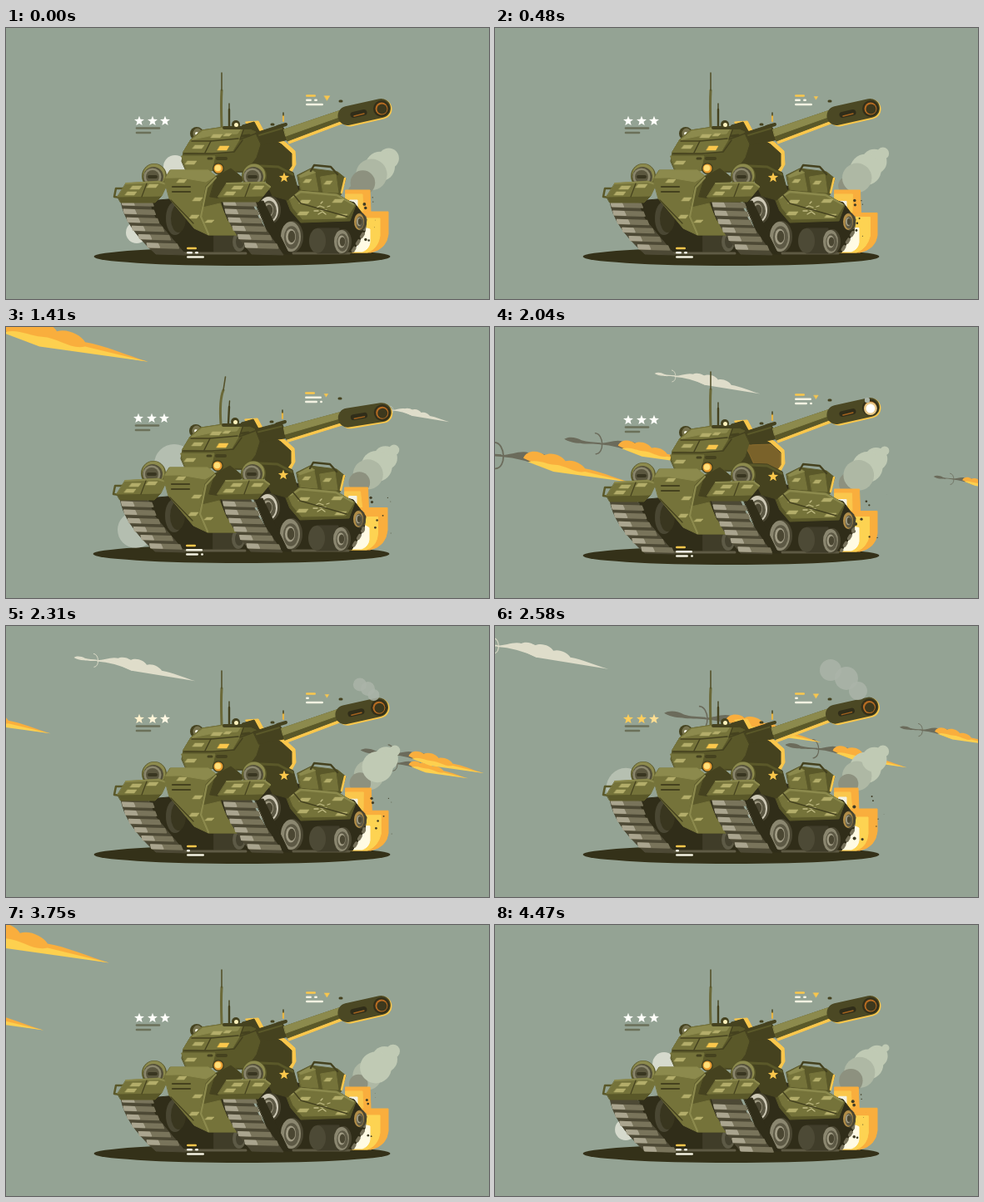
Recreate the animation shown at these times as an HTML page with a canvas. Size 580x326 px, loop 4500 ms.

```html
<!DOCTYPE html>
<html lang="en">
<head>
<meta charset="utf-8">
<title>Tank</title>
<style>
html, body { margin: 0; width: 100%; height: 100%; overflow: hidden; background: #94a394 }
canvas { display: block }
</style>
</head>
<body>
<canvas id="stage" width="580" height="326"></canvas>
<script>
const g = document.getElementById('stage').getContext('2d');
const LOOP = 4500;
const BASE = '#75733a', LIGHT = '#8c8a4d', SHADE = '#5a5829', DARK = '#45421f', BLACK = '#302d19',
  PATCH = '#b3ad6a', YELLOW = '#fac74c', ORANGE = '#f9ae3d', WHITE = '#f3f2e2', SMOKE = '#6b6b5b';

g.lineCap = g.lineJoin = 'round';

// Drawing helpers: filled path, stroked path, ellipse, group
function fill(color, d, round = 1) {
  const p = new Path2D('M' + d + 'z');
  g.fillStyle = g.strokeStyle = color;
  g.lineWidth = round;
  g.fill(p);
  if (round) g.stroke(p);
}
function line(color, width, d) {
  g.strokeStyle = color;
  g.lineWidth = width;
  g.stroke(new Path2D('M' + d));
}
function oval(color, x, y, rx, ry = rx, angle = 0) {
  g.fillStyle = color;
  g.beginPath();
  g.ellipse(x, y, Math.max(0, rx), Math.max(0, ry), angle, 0, 7);
  g.fill();
}
function group(draw, place) {
  g.save();
  if (place) place();
  draw();
  g.restore();
}
function pivot(deg, x, y) {
  g.translate(x, y);
  g.rotate(deg * Math.PI / 180);
  g.translate(-x, -y);
}
function patches(color, list, w = 11, h = 4) {
  for (const [x, y] of list) fill(color, `${x} ${y}h${w}l-3 ${h}h${-w}`, .5);
}
const mix = (a, b, k) => a + (b - a) * k;
const bell = (t, center, width) => Math.max(0, 1 - ((t - center) / width) ** 2);
const noise = n => { const v = Math.sin(n * 91.7) * 4375.5; return v - Math.floor(v); };

// Body lift over the bump, then a damped bounce after landing
const lift = t => t > 560 && t < 1330 ? Math.sin(Math.PI * (t - 560) / 770) : 0;
const bounce = t => t > 1300 && t < 2040 ?
  1.47 * Math.exp((1300 - t) / 300) * Math.sin((t - 1300) / 80) : 0;

// Aircraft: keys are [time, nose x, nose y, body length]
const planes = [
  { reach: 3.84, keys: [[900, 427, 110, 36], [1410, -128, -14, 78]] },
  { reach: 5.3, pale: true, keys: [[2040, 192, 56, 24], [2580, -28, 20, 31]] },
  { reach: 3.84, keys: [[1410, 620, 235, 22], [2040, 84, 135, 43]] },
  { reach: 3.84, keys: [[1410, 615, 262, 28], [2040, -46, 148, 54]] },
  { reach: 3.84, keys: [[2040, 527, 180, 23], [2580, 349, 143, 38], [3120, 57, 107, 60]] },
  { reach: 3.84, keys: [[2580, 204, 105, 49], [3120, -241, 16, 70]] },
  { reach: 4.5, keys: [[2580, 487, 122, 26], [3120, -90, -3, 50]] },
  { reach: 5, keys: [[3120, 457, 110, 25], [3660, -60, 10, 50]] }
];
function drawPlane({ reach, pale, keys }, t) {
  const i = keys.length > 2 && t > keys[1][0] ? 1 : 0;
  const a = keys[i], b = keys[i + 1], k = (t - a[0]) / (b[0] - a[0]);
  const [, x, y, size] = a.map((v, n) => mix(v, b[n], k));
  if (size < 4 || x > 590 || x + size * reach < 0) return;
  const body = pale ? '#dfddca' : SMOKE;
  group(() => {
    g.scale(size / 60, size / 60);
    fill(body, '0 0C8 -5 20 -3 29 2 38 5 50 5 61 6L61 9C50 8 35 9 27 7 16 7 6 4 0 0', 0);
    line(body, 2, '52 -10C66 -9 68 24 53 25');
    g.translate(60, 7);
    const s = (reach * 60 - 60) / 170;
    g.scale(s, s);
    fill(body, '0 0C14 0 26 -7 38 -3 55 -6 68 4 86 14L60 18Q30 4 0 2', 0);
    fill(pale ? body : ORANGE, '30 4C34 -7 50 -7 58 0 68 -5 82 1 86 8 95 5 108 11 112 18 130 21 150 30 170 36L60 18', 0);
    if (!pale) fill('#fdd04f', '36 9C50 5 60 12 72 13 88 14 98 25 112 22L170 36 70 22', 0);
  }, () => g.translate(x, y));
}

function drawSmoke(t) {
  g.fillStyle = '#c9d0c2';
  const side = Math.max(bell(t, 900, 330), bell(t, 2850, 620));
  const low = Math.max(bell(t, 0, 420), bell(t, 4500, 420), bell(t, 1410, 360));
  const late = bell(t, 1410, 500);
  g.globalAlpha = .65;
  oval('#c9d0c2', 157, 196, 29 * side, 31 * side);
  g.globalAlpha = 1 - .5 * late;
  oval('#d6dacd', 157, 246, (13 + 9 * late) * low);
  oval('#d6dacd', 203, 167, (14 + 10 * late) * low);
  g.globalAlpha = 1;
  for (let i = 4; i >= 0; i--) {
    const u = (t / 1500 + i / 5) % 1;
    oval(u < .25 ? '#8d917f' : u < .5 ? '#aeb8a4' : '#c0cab4',
      mix(418, 470, u), mix(196, 147, u), 19 * Math.sin(Math.PI * (.12 + .82 * u)));
  }
}

function drawFire(t) {
  const f = 1.5 * Math.sin(t / 4500 * Math.PI * 24);
  fill(ORANGE, `408 195L${437 + f} 195 ${438 + f} 222 408 222`, 1);
  fill(YELLOW, `408 200L${428 + f} 200 429 222 408 222`, 1);
  fill(WHITE, `413 ${207 + f}h9v9h-9`, 1);
  fill(ORANGE, `408 ${221 + f}H459V${248 + f}Q457 266 438 270L412 270`, 1);
  fill('#fdd352', `408 ${229 - f}H${449 + f}V250Q447 265 434 270L412 270`, 1);
  fill('#fffbe4', `412 247Q430 ${238 + f} 437 ${242 - f}V258Q436 266 428 269L412 269`, 1);
  const spread = t > 600 && t < 3500 ? 1 : .4;
  for (let i = 0; i < 9; i++) {
    const u = (t / 900 + noise(i)) % 1;
    oval('#3f3c25', 428 + 45 * u * spread, 208 + 55 * noise(i + 20) - 8 * u, 2.2 * (1 - u));
  }
}

function drawTrack(x, bend, curve, width, t) {
  const edge = u => x + bend * u + curve * u * u;
  fill('#4d4935', `${x} 208Q${x + bend / 2} 238 ${edge(1)} 272L${edge(1) + width} 273 ${x + width + 6} 230 ${x + width - 4} 208`);
  for (let i = 0; i < 6; i++) {
    const u = (i + (t / 150) % 1) / 6, y = 208 + 61 * u, left = edge(u);
    fill('#79745b', `${left + 1} ${y}l${width} 1l2 5l${-width} -1`, 1.5);
    fill('#aaa58f', `${left + 1} ${y}l13 .5l2 4.5l-14 -.5`, 1.5);
  }
}

function drawDrum(x, y) {
  oval(SHADE, x + 1, y, 15);
  oval(LIGHT, x + 1, y - 1, 13.5);
  oval('#545039', x, y + 1, 12);
  oval('#8b876d', x - 1, y + 1, 10.5);
  oval('#5b573f', x - 1, y + 1, 8);
  line('#393621', 4, `${x - 5} ${y + 1}h8`);
}

function drawWheel(x, y, rx, ry, rim = '#8b8770') {
  oval('#4a4632', x + 2, y, rx + 1, ry + 1);
  oval(rim, x, y, rx, ry);
  oval('#5d5945', x + 1, y + 1, rx * .75, ry * .76);
  oval('#a19c85', x, y, rx * .5, ry * .53);
  oval('#4b4733', x + 1, y, rx * .36, ry * .4);
}

function star(color, x, y, r) {
  g.beginPath();
  for (let i = 0; i < 10; i++) {
    const a = i * Math.PI / 5 - Math.PI / 2, q = i % 2 ? r * .42 : r;
    g.lineTo(x + q * Math.cos(a), y + q * Math.sin(a));
  }
  g.fillStyle = color;
  g.fill();
}

function drawGun(flash) {
  fill(DARK, '300 126 331 116 340 134 307 141');
  line(SHADE, 2, '304 129 331 121');
  fill(YELLOW, '336 126 404 103 406 114 340 139');
  fill(SHADE, '334 122 402 99 404 111 338 136');
  fill(LIGHT, '334 122 402 99 403 106 336 130');
  line(YELLOW, 24, '413 106.5 451.5 97.5');
  line('#4b4824', 23, '410 105.5 450.5 96.5');
  line(BLACK, 7, '417 104.5 430 101.5');
  line('#a3631f', 1.5, '418 106 430 103');
  oval('#34301a', 451, 97, 10);
  oval('#b86c22', 451, 97, 7.5);
  oval('#3d381d', 451.5, 97.5, 6);
  if (flash) {
    oval('#e9c98a', 451, 98, 8 * flash);
    oval('#fff', 451, 98, 5.5 * flash);
  }
}

function drawTurret(t) {
  const b = bounce(t), kick = t > 2040 ? 6 * Math.exp((2040 - t) / 400) * Math.min(1, (t - 2040) / 60) : 0;
  const flash = bell(t, 2050, 80);
  line('#6b6938', 3, `259 119Q${258 - b} 90 ${259 + 3 * b} ${75 + 3 * b}`);
  line('#55522b', 1.6, `${259 + 3 * b} ${75 + 3 * b}L${259 + 5.5 * b} ${54 + 8 * b}`);
  line(DARK, 2.4, `268 118L${268 + b} 98`);
  line(DARK, 1.4, `${268 + b} 98L${268 + 1.5 * b} 91`);
  oval(DARK, 229, 127, 8);
  oval('#77734f', 230, 127, 5.5, 6.5);
  oval(WHITE, 229, 127, 2);
  fill(YELLOW, '288 113 303 112 309 123 336 138 347 148 348 164 342 175 310 172 296 130');
  fill(DARK, '284 117 298 113 304 124 331 140 343 151 343 166 337 174 260 173 280 130');
  if (flash) {
    g.globalAlpha = .5 * flash;
    fill('#b08336', '300 142 331 141 343 152 343 166 337 174 314 172 306 154');
    g.globalAlpha = 1;
  }
  fill(SHADE, '211 160 213 149 222 134 235 123 262 119 286 119 300 125 306 137 300 156 288 172 216 171');
  fill(BASE, '213 149 222 134 235 123 262 119 286 119 281 133 272 148 252 151');
  fill(LIGHT, '224 134 236 124 262 120 283 120 278 127 244 130');
  fill(BASE, '211 154 251 154 247 172 217 171');
  line(DARK, 1.5, '214 151 248 151 274 149 284 135');
  line(DARK, 1.5, '223 136 246 136 279 133');
  line(DARK, 1.5, '246 136 239 150');
  line(DARK, 1.5, '286 120 281 134 300 127');
  patches(PATCH, [[249, 128], [227, 141], [218, 160]]);
  patches(PATCH, [[264, 127]], 7, 3);
  fill(YELLOW, '257 142h11l-3 5h-11', .5);
  line(DARK, 4, '254 157h10');
  line(DARK, 3, '284 130l8 -1');
  line(DARK, 3, '243 157h4');
  line(DARK, 4, '262 120h30');
  oval(DARK, 276, 116, 5);
  oval('#fff2bc', 276.5, 116.5, 2.5);
  line(DARK, 4, '326 119 336 116');
  line(DARK, 3, '319 116h2');
  line('#e7b545', 2.2, '333 112V105');
  line(DARK, 1.5, '333 105V102');
  line(DARK, 3, '401 88h2');
  group(() => drawGun(flash), () => {
    pivot(3.5 * b, 318, 130);
    g.translate(-kick, kick * .4);
  });
}

function drawFront(t) {
  fill(BLACK, '172 208 262 200 300 235 296 270 240 272 190 268');
  oval('#4a4733', 203, 229, 11, 20);
  oval('#39361f', 207, 229, 9, 17);
  fill('#403d29', '250 246H279V269H250');
  oval('#5d5a46', 280, 257, 8, 12);
  oval('#454230', 281, 257, 5, 8);
  line('#5f5b45', 3, '212 271H288');
  drawTrack(138, 8, 34, 36, t);
  line(SHADE, 2.5, '141 193 132 193 130 203 137 204');
  drawDrum(177, 178);
  fill(SHADE, '134 203 187 202 179 210 138 210');
  fill(BASE, '144 187 183 184 194 187 187 202 134 203');
  line(LIGHT, 2, '144 187 183 185 193 188');
  patches(PATCH, [[152, 190], [172, 188], [146, 197]]);
  line(DARK, 1.2, '169 187 163 203');

  fill(BASE, '190 182 197 171 243 171 253 179 240 191 233 228 243 249 226 241 196 205');
  fill(LIGHT, '192 180 198 171 243 171 252 178 240 185 210 180');
  fill(SHADE, '252 178 270 168 286 182 257 207 264 230 287 249 243 249 233 228 240 191');
  fill(DARK, '252 179 270 169 286 182 258 205 245 203');
  fill(BASE, '236 216 257 211 266 232 286 249 243 249 233 228');
  line(LIGHT, 2.2, '252 180 241 192 234 227 243 248');
  line(DARK, 2.2, '200 191h21');
  line(DARK, 2.2, '200 197h21');
  patches(PATCH, [[208, 182], [227, 204], [223, 225]], 9);
  patches(PATCH, [[242, 231]], 8, 3);
  line(DARK, 1.2, '198 207 225 235');
  oval(DARK, 255, 169, 7);
  oval('#e99d31', 255, 169, 5.5);
  oval('#ffdf78', 254.5, 168.5, 3.8);
}

function drawSide(t) {
  fill(BLACK, '300 195 350 190 418 210 433 230 431 245 416 270 335 272 315 250');
  g.setLineDash([4, 6]);
  g.lineDashOffset = t / 15;
  line('#77725b', 4, '431 228 430 246 416 269');
  g.setLineDash([]);
  line('#5d5943', 3, '345 271H412');
  fill('#403d2a', '374 241H400V271H374');
  oval('#4d4a36', 374, 256, 10, 15);
  drawWheel(403, 257, 9, 14);
  drawWheel(424, 233, 6, 10, '#b28e49');
  drawWheel(342, 251, 12, 18);
  drawWheel(315, 219, 12, 16, '#cdc8b5');

  fill(SHADE, '350 177 366 169 398 173 408 181 402 201 354 197');
  fill(BASE, '352 180 371 175 375 196 355 196');
  fill(BASE, '378 179 396 176 399 198 381 198');
  fill(LIGHT, '351 178 366 170 372 174 354 180', .5);
  patches(PATCH, [[360, 182], [385, 184]], 7);
  line(DARK, 2.5, '366 172 370 165 390 167 398 176');
  line(YELLOW, 2.5, '407 181 403 198');
  fill(SHADE, '336 204 352 195 398 200 420 213 413 232 354 234 342 220');
  fill(BASE, '340 204 353 196 398 200 419 213 409 229 356 230 345 217');
  line(LIGHT, 2.5, '343 204 354 197 397 201 417 212');
  patches(PATCH, [[355, 207], [353, 221], [399, 224], [395, 206]]);
  line('#c3be86', 1.3, '373 216l4 -2l5 2M370 220h5M378 219h7M375 224l5 -3l4 3M378 211l2 -2M386 215l3 -1');
  line(DARK, 1.4, '345 200 354 211 410 227');

  fill(DARK, '300 164 327 165 345 174 351 196 338 207 320 202 309 178');
  line(SHADE, 3, '306 166 327 167 344 176');
  star(YELLOW, 334, 180, 6.5);
  fill(BLACK, '299 209 309 208 339 270 326 272');
  drawTrack(260, 10, 25, 38, t);
  drawDrum(297, 178);
  fill(SHADE, '255 203 309 202 303 209 257 209');
  fill(BASE, '265 187 310 185 318 191 309 202 255 203');
  line(LIGHT, 2, '265 187 310 186 317 191');
  patches(PATCH, [[274, 190], [299, 190], [265, 197]]);
  line(DARK, 1.2, '293 187 287 203');
}

function drawPuffs(t) {
  if (t < 2040 || t > 3500) return;
  const puffs = [[403, 53, 13, 378, 43, 4], [422, 63, 14, 388, 43, 6], [436, 78, 11, 403, 48, 10]];
  const rise = Math.min(1, (t - 2040) / 540), fade = Math.max(0, (t - 2580) / 540);
  g.globalAlpha = Math.max(0, Math.min(.85, 1.1 - .45 * fade));
  for (const [x, y, r, x2, y2, r2] of puffs)
    oval('#aab4a8', t < 2580 ? mix(447, x, rise) : mix(x, x2, fade),
      t < 2580 ? mix(88, y, rise) : mix(y, y2, fade), t < 2580 ? mix(3, r, rise) : mix(r, r2, fade));
  g.globalAlpha = 1;
}

function drawRocks(t) {
  const k = bell(t, 900, 300);
  if (!k) return;
  g.globalAlpha = .75 * k;
  const dx = (t - 900) * .1;
  fill('#5e5944', `${293 + dx} 288l2 -14l6 -6l16 2l-3 18`);
  fill('#4d4935', `${322 + dx} 288l3 -10l12 2l3 9`);
  fill('#5e5944', `${346 + dx} 289l3 -9l14 1l2 8`);
  fill('#4d4935', `${367 + dx} 273l3 -5l10 1l2 4`);
  g.globalAlpha = 1;
}

// Caption lines as [start, end] spans that change over time
const captions = [
  [600, [[0, 7], [10, 14]], [[0, 21]]],
  [1250, [[0, 15], [18, 21]], [[0, 21]]],
  [2300, [[0, 20]], [[0, 15], [18, 21]]],
  [2800, [[0, 4]], [[0, 21]]],
  [3500, [[2, 6]], [[0, 21]]],
  [LOOP, [[0, 7], [10, 14]], [[0, 21]]]
];
function drawCaption(x, y, t) {
  const rows = captions.find(c => t < c[0]);
  const bar = (color, a, b, dy) => line(color, 2.6, `${x + a + 1.3} ${y + dy}H${x + b - 1.3}`);
  bar(YELLOW, 0, 12, 0);
  rows[1].forEach(([a, b]) => bar(WHITE, a, b, 5.2));
  rows[2].forEach(([a, b]) => bar(WHITE, a, b, 10.5));
}

function drawLabels(t) {
  const glow = bell(t, 2820, 560);
  [160, 176, 191].forEach((x, i) => {
    const k = Math.min(1, glow * (1.6 - .4 * i)) * (t > 2820 ? 1 - .4 * i : 1);
    star(`rgb(255,${mix(255, 205, k)},${mix(250, 90, k)})`, x, 112, 6.3);
  });
  line('#6b7059', 2.6, '157 120.5H184');
  line('#6b7059', 2.6, '157 126H173');
  drawCaption(360, 81.5, t);
  drawCaption(217, 265, t);
  const r = 2.7 + .6 * Math.cos(t / LOOP * Math.PI * 10);
  fill(YELLOW, `${385.5 - r} ${84 - r * .7}h${2 * r}l${-r} ${r * 1.6}`, .5);
}

function frame() {
  const t = performance.now() % LOOP, k = lift(t), b = bounce(t);
  g.fillStyle = '#94a394';
  g.fillRect(0, 0, 580, 326);
  planes.forEach(p => drawPlane(p, t));
  group(() => {
    oval('#343119', 283.5, 275, 178, 11);
    drawSmoke(t);
    drawFire(t);
    drawRocks(t);
    group(() => drawTurret(t), () => pivot(4 * k, 310, 205));
    group(() => drawFront(t), () => g.translate(k, -9 * k));
    group(() => drawSide(t), () => pivot(5 * k, 458, 213));
    drawPuffs(t);
    drawLabels(t);
  }, () => g.translate(-b, -2 * b));
  requestAnimationFrame(frame);
}
frame();
</script>
</body>
</html>
```
